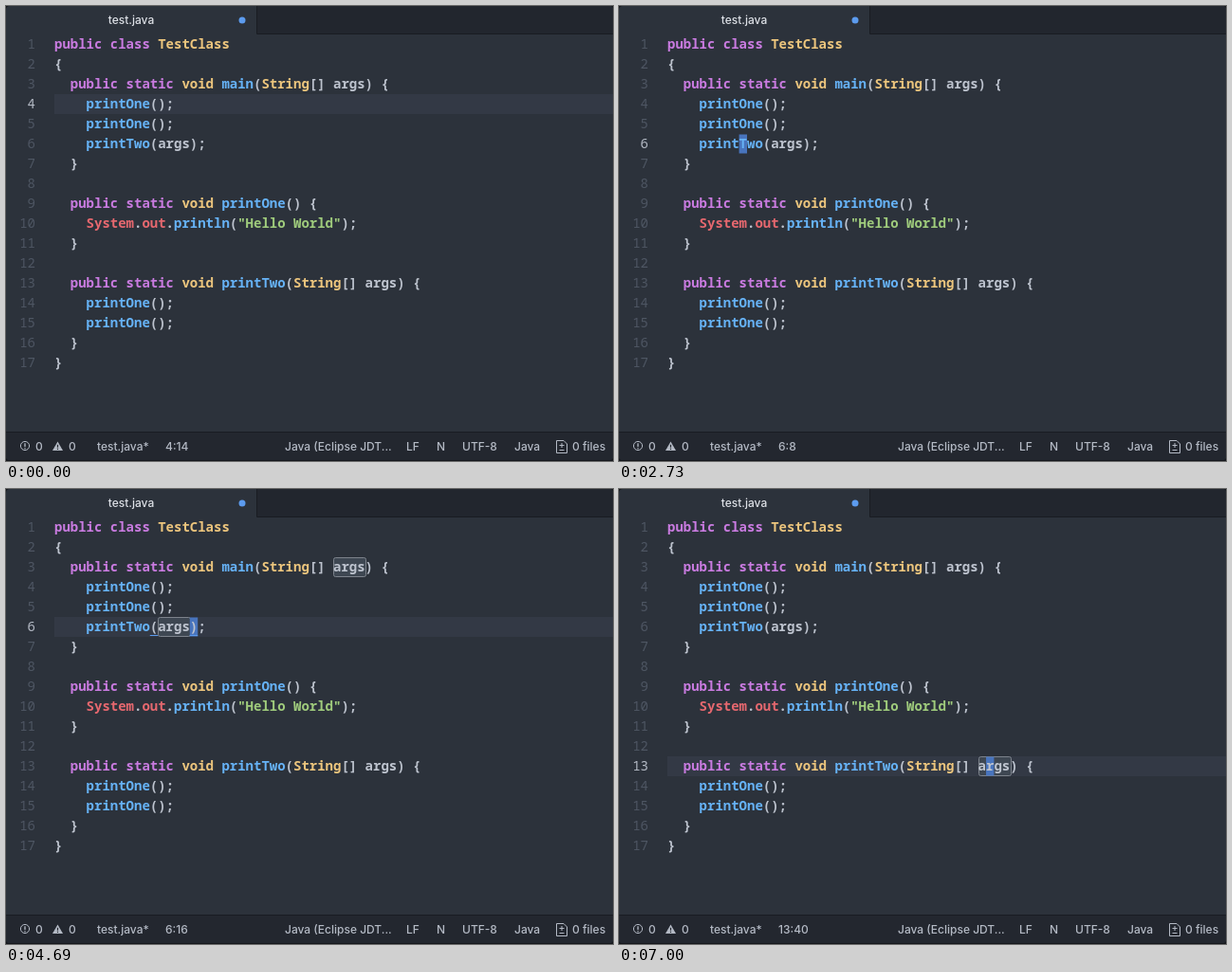
Write an HTML page that moves like this. It is 640x480 px and loops after 7070 ms.

```html
<!DOCTYPE html>
<html lang="en">
<head>
<meta charset="utf-8">
<title>Editor</title>
<style>
  html, body { margin: 0; width: 100%; height: 100%; overflow: hidden; background: #14161b; }
  svg { display: block; width: 640px; height: 480px; }
  .code text { font: 600 14px "Noto Sans Mono", "Liberation Mono", monospace; white-space: pre; }
  .gutter text { font: 400 14px "Noto Sans Mono", "Liberation Mono", monospace; text-anchor: end; }
  .ui text { font: 500 12px Inter, Roboto, sans-serif; fill: #b4bac5; }
  .ui .title { fill: #dde0e6; text-anchor: middle; }
  .box { fill: #3e4752; stroke: #7d838c; }
</style>
</head>
<body>
<svg id="stage" viewBox="0 0 640 480">
  <rect width="640" height="479" rx="4" fill="#2c323b"/>
  <path d="M264 0H636Q640 0 640 4V29H264Z" fill="#22262e"/>
  <path d="M264.5 0V29.5H640" fill="none" stroke="#191c22"/>
  <path d="M0 450H640V475Q640 479 636 479H4Q0 479 0 475Z" fill="#23272f"/>
  <path d="M0 449.5H640" stroke="#191c22"/>
  <circle cx="249" cy="15" r="3.5" fill="#5c9bee"/>
  <rect id="row" x="51" width="589" height="21" fill="#333945"/>
  <g id="boxes"></g>
  <rect id="cursor" width="8.4" height="20" fill="#4874bd"/>
  <g id="gutter" class="gutter"></g>
  <g id="code" class="code"></g>
  <g id="brackets" stroke="#5c9bee"></g>
  <g id="ui" class="ui">
    <g fill="none" stroke="#b4bac5">
      <circle cx="20" cy="464" r="4.6"/>
      <path d="M20 461.2V465M20 466V467.2" stroke-width="1.3"/>
      <path d="M580.5 458.5H588L591.5 462V471.5H580.5ZM583.5 463.5H588.5M586 461V466M583.5 468.5H588.5"/>
    </g>
    <path d="M54.5 459.5L60 469H49Z" fill="#b4bac5"/>
    <path d="M54.5 462.7V465.8M54.5 466.7V467.9" stroke="#23272f" stroke-width="1.2"/>
    <text class="title" x="132" y="19">test.java</text>
  </g>
</svg>
<script>
const LOOP = 7070, BLINK = 800, BOX_DELAY = 840;
const LEFT = 51, TOP = 30, CHAR = 8.4, LINE = 21;
const byId = id => document.getElementById(id);
const colX = col => LEFT + col * CHAR;
const rowY = line => TOP + (line - 1) * LINE;

function add(parent, tag, attrs, text = "") {
  const node = document.createElementNS("http://www.w3.org/2000/svg", tag);
  for (const key in attrs) node.setAttribute(key, attrs[key]);
  node.textContent = text;
  return parent.appendChild(node);
}

const source = `public class TestClass
{
  public static void main(String[] args) {
    printOne();
    printOne();
    printTwo(args);
  }

  public static void printOne() {
    System.out.println("Hello World");
  }

  public static void printTwo(String[] args) {
    printOne();
    printOne();
  }
}`.split("\n");

const colors = [
  [/^"/, "#9fcb7c"],
  [/^(public|class|static)$/, "#c97be0"],
  [/^(void|String|TestClass)$/, "#ecc57d"],
  [/^(main|print\w+)$/, "#66b2f6"],
  [/^(System|out)$/, "#e6686f"],
  [/./, "#bdc3ce"]
];

const numbers = source.map((text, i) => {
  const y = rowY(i + 1) + 15;
  for (const m of text.matchAll(/"[^"]*"|\w+|[^\s\w"]+/g)) {
    const fill = colors.find(([pattern]) => pattern.test(m[0]))[1];
    add(byId("code"), "text", { x: colX(m.index), y, fill }, m[0]);
  }
  return add(byId("gutter"), "text", { x: 31, y }, i + 1);
});

const label = (x, text) => add(byId("ui"), "text", { x, y: 469 }, text);
[[31, "0"], [66, "0"], [96, "test.java*"], [294, "Java (Eclipse JDT..."], [422, "LF"], [454, "N"],
 [481, "UTF-8"], [536, "Java"], [597, "0 files"]].forEach(item => label(...item));
const position = label(168, "");

// Each stop: caret place, shown position, and marked words as [line, column, length].
const stops = [
  { at: -520, line: 4, col: 15, pos: "4:14", row: true, words: [] },
  { at: 1190, line: 4, col: 10, pos: "4:9", row: true,
    words: [[4, 4, 8], [5, 4, 8], [9, 21, 8], [14, 4, 8], [15, 4, 8]] },
  { at: 2730, line: 6, col: 9, pos: "6:8", row: false, words: [[6, 4, 8], [13, 21, 8]] },
  { at: 3780, line: 6, col: 17, pos: "6:16", row: true, words: [[3, 35, 4], [6, 13, 4]], brackets: [12, 17] },
  { at: 6160, line: 13, col: 40, pos: "13:40", row: true, words: [[13, 39, 4]] }
];

for (const stop of stops) {
  stop.boxes = add(byId("boxes"), "g", {});
  for (const [line, col, length] of stop.words) {
    add(stop.boxes, "rect", { class: "box", x: Math.round(colX(col)) + .5, y: rowY(line) + .5,
      width: Math.round(length * CHAR), height: 20, rx: 2 });
  }
  stop.marks = add(byId("brackets"), "g", {});
  for (const col of stop.brackets || []) {
    add(stop.marks, "path", { d: `M${colX(col)} ${rowY(stop.line) + 19.5}h${CHAR}` });
  }
}

const show = (node, on) => node.setAttribute("visibility", on ? "visible" : "hidden");

function draw(time) {
  const now = stops.findLast(stop => stop.at <= time);
  const age = time - now.at;
  for (const stop of stops) {
    show(stop.boxes, stop === now && age >= BOX_DELAY);
    show(stop.marks, stop === now);
  }
  numbers.forEach((node, i) => node.setAttribute("fill", i + 1 === now.line ? "#b4bac5" : "#4e5663"));
  const cursor = byId("cursor"), row = byId("row");
  cursor.setAttribute("x", colX(now.col));
  cursor.setAttribute("y", rowY(now.line) + .5);
  show(cursor, age % BLINK < BLINK / 2);
  row.setAttribute("y", rowY(now.line));
  show(row, now.row);
  position.textContent = now.pos;
}

const start = performance.now();
function tick() {
  draw((performance.now() - start) % LOOP);
  requestAnimationFrame(tick);
}
tick();
</script>
</body>
</html>
```
